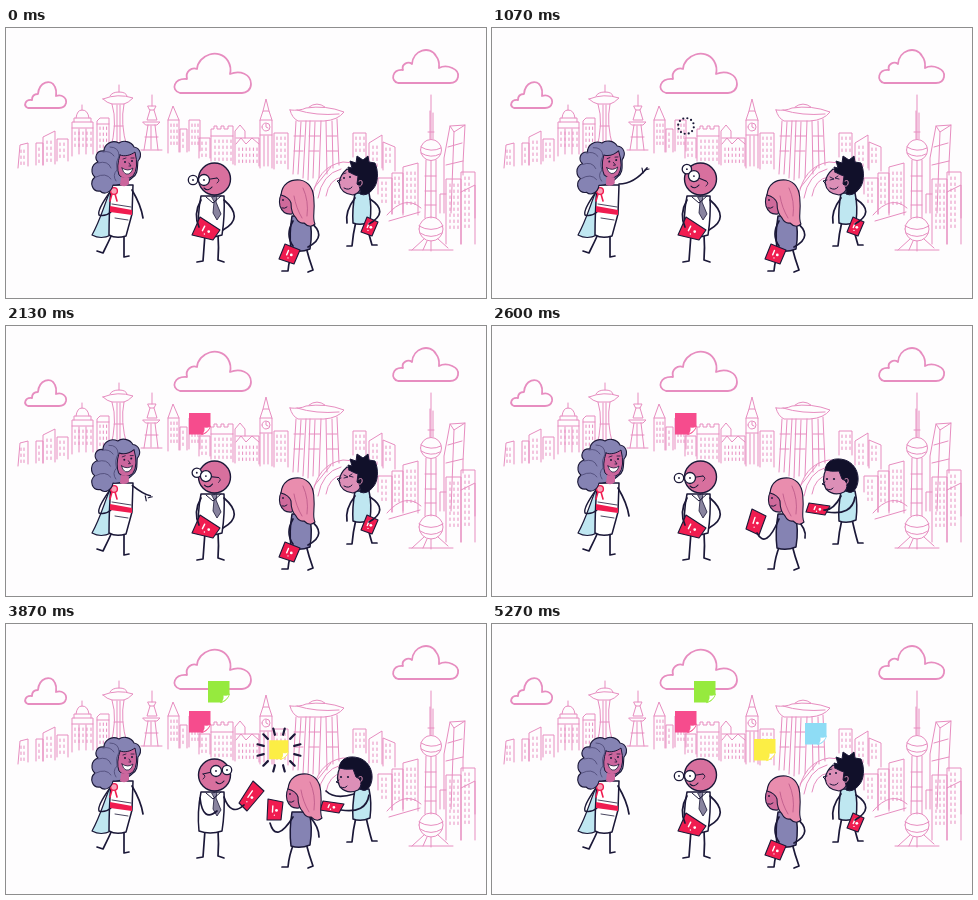
Recreate the animation shown at these times as an HTML page with a canvas. Size 480 px wide and 270 px high, loop 5.34 s.

```html
<!DOCTYPE html>
<html lang="en">
<head>
<meta charset="utf-8">
<title>Team posting notes over a city</title>
<style>
html, body { margin: 0; width: 100%; height: 100%; overflow: hidden; background: #fefdfe; }
canvas { display: block; }
</style>
</head>
<body>
<canvas id="stage" width="480" height="270"></canvas>
<script>
const ctx = document.getElementById('stage').getContext('2d');
const LOOP = 5340, STEP = LOOP / 80;
const INK = '#1b1838', PINK = '#e78dc0', RED = '#f01c50', LILAC = '#8583b3', SKY = '#bfe7f1';
ctx.lineCap = ctx.lineJoin = 'round';

function draw(d, fill, stroke = INK, width = 1.5) {
  const p = new Path2D(d);
  if (fill) { ctx.fillStyle = fill; ctx.fill(p); }
  if (stroke) { ctx.strokeStyle = stroke; ctx.lineWidth = width; ctx.stroke(p); }
}
const circle = (x, y, r) => `M${x - r} ${y}a${r} ${r} 0 1 0 ${2 * r} 0a${r} ${r} 0 1 0 ${-2 * r} 0`;
const dot = (x, y, r, color = INK) => draw(circle(x, y, r), color, null);
const line = (d, width = 1.7, color = INK) => draw(d, null, color, width);
const arm = a => line(`M${a.slice(0, 2)}Q${a.slice(2)}`);

// Eased pose: starts at base, then moves to each [start, end, values] in turn.
function pose(t, base, ...moves) {
  let now = base;
  for (const [start, end, next] of moves) {
    let k = Math.min(1, Math.max(0, (t - start) / (end - start)));
    k = k * k * (3 - 2 * k);
    now = now.map((v, i) => v + (next[i] - v) * k);
  }
  return now;
}

// ---- Backdrop ----
const box = (x, y, w, h) => `M${x} ${y + h}V${y}h${w}v${h}`;
function windows(x, y, cols, rows, dx = 4, dy = 6, len = 2.5) {
  let d = '';
  for (let r = 0; r < rows; r++)
    for (let c = 0; c < cols; c++) d += `M${x + c * dx} ${y + r * dy}v${len}`;
  return d;
}
const clouds = `M174 65C164 62 168 50 181 51C179 43 186 39 191 41C192 27 213 19 222 33C225 38 225 42 224 46
  C234 42 245 46 245 56C245 62 240 65 236 65Z
  M392 55C384 53 386 41 397 42C395 36 402 33 406 36C407 22 424 17 430 28C434 33 433 37 433 40
  C441 36 454 41 452 49C451 54 448 55 444 55Z
  M22 80C17 78 19 71 26 72C26 67 29 66 32 66C33 54 45 50 49 59C51 63 50 66 50 68
  C56 66 61 70 60 75C59 79 57 80 53 80Z`;
const skyline = [
  'M12 140L14 117L22 115V138', windows(15, 122, 2, 3, 3),
  box(30, 115, 7, 22), windows(33, 120, 1, 3), 'M37 137V109L49 103V136', windows(41, 113, 2, 4),
  box(51, 111, 11, 22), windows(54, 115, 2, 3),
  'M66 128V94H87V126M68 94V90H85V94M70 90Q71 82 76 82Q82 82 83 90M76 82V77M66 100H87M73 101V126M80 101V126',
  windows(69, 104, 5, 3),
  'M91 125V93L94 90H103V124M91 96H103', windows(94, 99, 3, 4, 3.3),
  'M97 71Q112 65 127 70Q122 75 118 76H106Q101 75 97 71ZM104 68Q106 64 113 64Q120 64 121 68M113 64V57',
  'M106 76Q112 95 104 123M118 76Q114 96 121 119M111 77V120M114 77V119M108 98H117',
  'M146 67V78M142 78H150L148 82H144ZM144 82L141 92H151L148 82M137 94H154L151 97H140ZM142 97L138 122M149 97L152 122M145 98V121M139 109H152M135 122H156',
  'M162 125V92L167 78L173 92V124M162 92H173', windows(165, 96, 3, 4, 3),
  box(174, 101, 7, 23), windows(177, 105, 1, 3),
  box(183, 92, 11, 31), windows(186, 96, 3, 4, 3),
  'M193 130V110H204V130', windows(196, 114, 2, 3),
  'M205 133V101H208V98H211V101H215V98H218V101H222V98H227V136M205 108H227', windows(209, 112, 5, 4),
  'M229 137V103L234 97L239 103V110M230 110H253V138M230 116L235 110L240 116L246 110L253 116', windows(233, 120, 6, 3, 3.6),
  'M254 140V92H266V140M254 92L257 83H263L266 92M257 83L260 71L263 83M254 107H266M258 108V138M262 108V138',
  circle(260, 99, 4), 'M260 96V99L262 100',
  box(268, 105, 14, 36), windows(271, 109, 3, 5, 4),
  'M284 82Q294 83 300 80Q320 77 338 84Q332 92 318 93H292Q286 90 284 82ZM291 82Q310 88 333 86M303 79Q311 73 319 79',
  'M290 93L287 146M300 93L297 150M295 94L292 146M304 93L302 152M315 93L313 150M309 94L307 150M320 93L321 146M331 91L333 137M326 93L327 140',
  'M288 108H298M303 108H314M321 108H331M288 123H297M303 123H313M321 123H332',
  'M306 171Q311 138 337 134Q352 134 362 144M312 170Q316 146 335 141M320 168Q323 151 336 149M308 160L325 139',
  box(347, 105, 13, 24), windows(350, 109, 3, 3), 'M363 139V115L376 107V140', windows(367, 118, 2, 4),
  'M377 142V114L389 119V143', windows(380, 120, 2, 3),
  'M372 166V150H386V186M386 186V145H397V185M397 187V139L412 135V187', windows(376, 154, 2, 4), windows(389, 149, 2, 5), windows(401, 144, 3, 6),
  'M381 187Q399 166 415 180M383 193L414 184',
  'M425 67V111M424 83V111M427 85V111M422 104H428', circle(425, 122, 10.5), 'M415 119Q425 125 435 120M415 125Q425 131 434 126',
  'M420 132L419 190M425 133V190M430 132V190M419 148H430M419 163H430M419 177H430', circle(425, 201, 12),
  'M413 198Q425 205 437 198M414 205Q425 212 436 205M418 211L406 222M432 211L442 220M425 213V223M421 213L417 222M403 222H447',
  'M438 185V130L444 98L459 97L457 135V147M444 98L448 104L459 97M442 119L456 115M440 137L457 133M448 104L445 185',
  'M440 216V151H455V216M455 216V144H469V190M455 164L469 157V216', windows(444, 156, 3, 8), windows(459, 149, 2, 9),
  'M434 185V166H440'
].join('');

// ---- Sticky notes ----
const notes = [
  [194, 98, '#f64c8d', 1000], [213, 68, '#96ea3e', 3270],
  [273, 126, '#fcee45', 3540], [324, 110, '#8edcf5', 3805]
];
function note([x, y, color, start], t) {
  const age = t - start;
  if (age < 0) return;
  ctx.save();
  ctx.translate(x, y);
  if (age < 200) {
    const r = 4 + 4 * Math.min(1, age / 70);
    for (let i = 0; i < 12; i++) {
      const a = i * Math.PI / 6 + age / 400;
      dot(r * Math.cos(a), r * Math.sin(a), 1.1);
    }
  } else {
    const k = Math.min(1, (age - 200) / 330), size = Math.min(1, .5 + k * 2);
    if (k < 1) for (let i = 0; i < 12; i++) {
      const a = (i + .5) * Math.PI / 6, inner = 14 + 9 * k, outer = inner + 8 * (1 - k);
      const cx = Math.cos(a), cy = Math.sin(a);
      line(`M${inner * cx} ${inner * cy}L${outer * cx} ${outer * cy}`, 2.2);
    }
    ctx.scale(size, size);
    draw('M-11-11H10.5V2Q8 9 3 10.5H-11Z', color, null);
    draw('M2 10.5Q5 7 4 3Q8 4 10.5 2Q9 8 2 10.5Z', '#fff', color, .9);
  }
  ctx.restore();
}

// ---- People ----
function tablet(q) {
  draw(`M${q}Z`, RED, INK, 1.1);
  const spot = (u, v) => [0, 1].map(i =>
    (q[i] * (1 - u) + q[i + 2] * u) * (1 - v) + (q[i + 6] * (1 - u) + q[i + 4] * u) * v);
  line(`M${spot(.35, .3)}L${spot(.35, .6)}`, 1.4, '#fff');
  dot(...spot(.62, .5), 1.4, '#fff');
  dot(...spot(.5, .75), .7, '#fff');
}

function presenter(t) {
  const [lift] = pose(t, [0], [700, 960, [1]], [1900, 2200, [0]]);
  draw('M105 161C99 174 95 191 86 207Q95 212 105 207Z', SKY, INK, 1.2);
  line('M107 204Q102 215 97 225L91 223M118 206L118 229L123 228');
  draw('M105 157Q103 185 103 207Q110 211 120 208L126 186L127 157Z', '#fff');
  line('M104 164Q91 182 93 187Q99 189 105 184', 1.4);
  draw('M104 178L126 182V187L104 184Z', RED, null);
  line('M106 176L125 179M109 190L122 192', .8);
  line('M106 166L104 173M109 166L111 173', 1.6, RED);
  draw(circle(108, 163, 3.4), '#f8a2b8', RED, 1.4);
  const hand = pose(t, [126, 162, 135, 177, 137, 190], [700, 960, [127, 156, 142, 156, 155, 140]], [1900, 2200, [126, 162, 135, 177, 137, 190]]);
  arm(hand);
  const [x, y] = hand.slice(4);
  if (lift > .3) line(`M${x - 4} ${y + 5}l-1-5M${x - 2} ${y + 2}l4-1`, 1.2);

  ctx.save();
  ctx.translate(112, 158);
  ctx.rotate(-.07 * lift);
  ctx.translate(-112, -158);
  draw(`M113 115C105 111 98 117 98 123C90 122 88 130 92 134C84 137 85 146 89 149C83 154 86 164 94 163
    C99 168 106 163 107 157C114 158 122 154 126 150C133 146 131 138 132 133C137 127 134 120 128 119C125 113 117 112 113 115Z`, LILAC, INK, 1.1);
  draw('M114 127C119 129 125 127 129 124Q133 140 127 148Q119 154 113 147Q110 139 114 127Z', '#cb669d', INK, 1);
  draw('M115 149L114 157Q119 160 123 156V150Z', '#cb669d', null);
  line('M97 124Q104 122 108 128M92 135Q102 132 105 140M90 149Q100 144 105 151M104 119Q113 119 113 128Q109 134 111 142Q106 147 110 153', .8, '#4b4774');
  dot(119, 134, 1); dot(126, 133, 1);
  line('M117 131l3-1M125 130l3 0M123 135l2 3l-2 0', .8);
  draw('M116 140Q122 144 127 140Q125 147 120 146Q117 145 116 140Z', '#fff', INK, .8);
  ctx.restore();
}

function bald(t) {
  const down = [194, 189, 214, 202, 207, 212, 186, 207], up = [247, 157, 258, 167, 241, 187, 233, 179];
  const q = pose(t, down, [2900, 3200, up], [4260, 4530, down]);
  const near = [195, 172, 187, 186, 193, 199], nearUp = [194, 174, 197, 199, 211, 187];
  const far = [218, 172, 239, 190, 217, 202], farUp = [218, 173, 225, 193, 238, 181];
  line('M199 206Q198 220 197 233L191 234M212 206Q213 220 212 232L218 234');
  draw('M195 168Q191 188 193 207Q204 211 216 207Q219 188 218 168Z', '#fff');
  draw('M206 169L211 168L210 174L215 186L211 192L207 185L208 174Z', '#89849f', INK, .8);
  line('M200 169L207 175L215 168', 1);
  draw(circle(208.5, 151, 16), '#d8709e', INK, 1.4);
  const face = pose(t, [187, 152, 198, 152, 211, 150, 202, 160],
    [900, 1080, [195, 141, 202, 148, 214, 153, 203, 158]],
    [1930, 2200, [187, 152, 198, 152, 211, 150, 202, 160]],
    [2900, 3130, [221, 146, 210, 147, 197, 150, 214, 158]],
    [4260, 4480, [187, 152, 198, 152, 211, 150, 202, 160]]);
  const [ax, ay, bx, by, ex, ey, mx, my] = face;
  line(`M${bx} ${by}L${ex} ${ey}`, 1.1);
  draw(circle(ax, ay, 4.7), '#fff', INK, 1.3);
  draw(circle(bx, by, 5.5), '#fff', INK, 1.3);
  dot(ax, ay, .9); dot(bx, by, .9);
  line(`M${mx - 4} ${my}q4 4 8-1`, 1.1);
  line(`M${ex} ${ey}q4 2 0 5`, .9);
  tablet(q);
  arm(pose(t, near, [2900, 3200, nearUp], [4260, 4530, near]));
  arm(pose(t, far, [2900, 3200, farUp], [4260, 4530, far]));
}

function longHair(t) {
  const down = [279, 216, 294, 222, 288, 236, 273, 231], mid = [260, 183, 274, 190, 267, 209, 254, 203];
  const up = [262, 175, 277, 178, 275, 196, 261, 196];
  const moves = (a, b, c) => pose(t, a, [2080, 2380, b], [2870, 3130, c], [4730, 5030, a]);
  const [dx, dy] = moves([0, 0], [3, 0], [7, -2]);
  const q = moves(down, mid, up);
  const raised = t > 2220 && t < 4880;
  line('M288 219Q283 231 282 243L276 243M300 219Q303 231 307 242L302 244');
  if (raised) tablet(q);
  draw('M286 188Q283 206 285 222Q294 225 304 221Q307 203 303 188Z', LILAC);
  arm(moves([287, 193, 279, 207, 287, 218], [287, 193, 274, 224, 265, 207], [287, 193, 270, 220, 264, 199]));
  arm(moves([303, 193, 323, 208, 302, 219], [304, 193, 315, 203, 313, 212], [304, 193, 313, 203, 313, 213]));
  if (!raised) tablet(q);
  ctx.save();
  ctx.translate(dx, dy);
  draw('M277 163Q272 170 274 178Q277 187 286 186L292 168Z', '#cf6a9b', INK, 1.1);
  dot(277, 172, .9);
  line('M276 180q3 1 5-1', 1);
  draw(`M275 167C276 156 284 151 294 152C305 154 308 163 308 174C309 183 306 190 309 196
    Q304 201 298 195Q293 196 290 190Q285 185 285 175Q283 169 275 167Z`, '#e98dae', INK, 1.1);
  line('M288 168Q290 180 296 190M297 160Q303 173 301 188', .8, '#b95687');
  ctx.restore();
}

function quiff(t) {
  const down = [361, 189, 372, 194, 366, 208, 355, 204], up = [317, 177, 338, 180, 333, 189, 314, 186];
  const moves = (a, b) => pose(t, a, [2080, 2400, b], [4790, 5090, a]);
  const looksDown = t > 2150 && t < 4350;
  const squint = t > 900 && t < 2150 || t > 4350 && t < 4950;
  line('M350 193Q347 206 346 218L341 218M360 193Q363 207 366 217L371 217');
  draw('M349 165Q346 182 347 195Q355 198 364 194Q366 178 363 165Z', SKY);
  tablet(moves(down, up));
  arm(moves([364, 171, 384, 184, 363, 196], [363, 171, 360, 190, 335, 186]));
  const rest = [349, 170, 339, 183, 341, 195];
  arm(pose(t, rest, [2080, 2400, [349, 170, 341, 185, 332, 184]], [3500, 3700, [348, 170, 329, 176, 320, 167]],
    [4050, 4250, [349, 170, 341, 185, 332, 184]], [4790, 5090, rest]));
  if (looksDown) {
    draw('M334 143Q329 154 334 163Q342 171 352 166Q360 158 354 142Z', '#dc8fb7', INK, 1.2);
    draw('M333 144C334 134 343 131 353 134C365 138 369 152 364 162Q360 169 354 165Q357 155 350 153L347 145Q339 146 333 144Z', '#11102a', INK, 1);
    dot(335, 153, 1.1); dot(342, 153, 1.1);
    line('M333 156l-3 2l3 1M335 163q4 2 6-1', 1);
  } else {
    draw('M341 141Q334 147 333 155Q335 166 347 167Q358 164 357 148Z', '#dc8fb7', INK, 1.2);
    draw('M343 144L342 139L346 140L344 133L350 135L351 128L357 132L362 128L363 134L369 135C373 144 372 156 367 161Q361 169 354 166Q355 159 351 156L352 148Q348 147 343 144Z', '#11102a', INK, 1);
    if (squint) line('M338 149l4 2l-4 1M346 148l-3 2l4 1', .9);
    else { dot(338, 150, 1); dot(344, 149, 1); line('M337 146l3-1', .8); }
    line('M335 152l-4 1l3 3M338 160q5 3 8-1', 1);
  }
  line('M353 153q4-2 3 3q-1 3-4 2', 1, '#dc8fb7');
}

function frame(now) {
  const t = Math.floor(now % LOOP / STEP) * STEP;
  ctx.fillStyle = '#fefdfe';
  ctx.fillRect(0, 0, 480, 270);
  line(skyline, 1, PINK);
  draw(clouds, '#fefdfe', PINK, 1.8);
  for (const n of notes) note(n, t);
  presenter(t);
  bald(t);
  quiff(t);
  longHair(t);
}

const began = performance.now();
function tick() {
  frame(performance.now() - began);
  requestAnimationFrame(tick);
}
tick();
</script>
</body>
</html>
```
